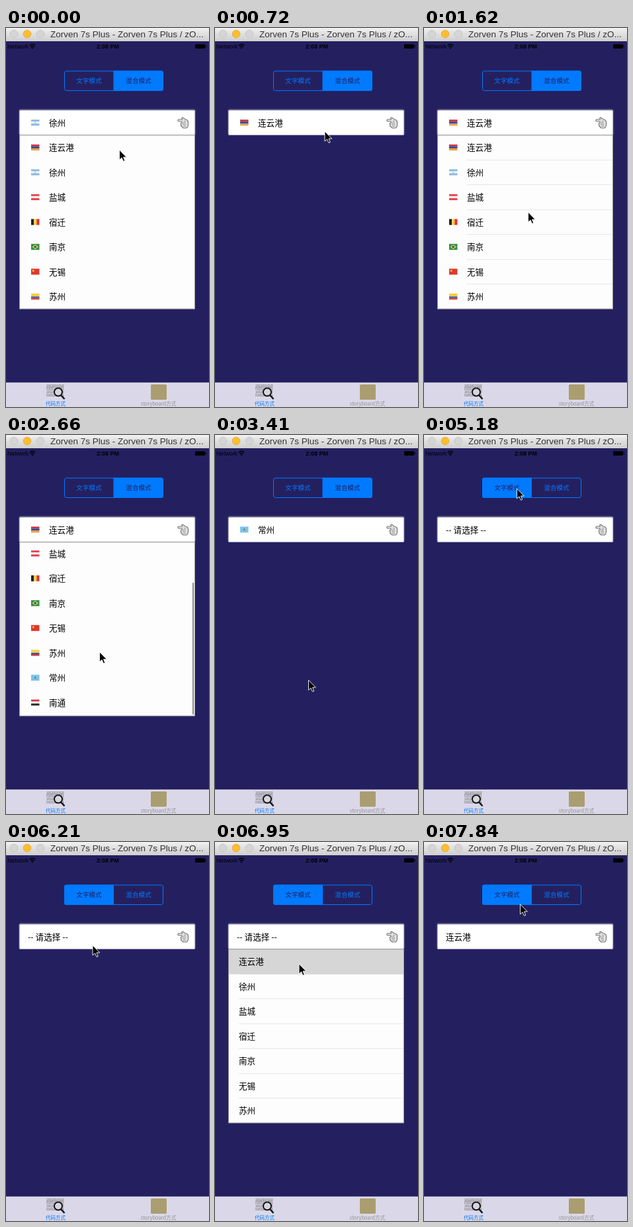
Write an HTML page that moves like this. It is 307 by 572 pixels and loops after 7.99 s.

```html
<!DOCTYPE html>
<html lang="zh">
<head>
<meta charset="utf-8">
<style>
html, body { margin: 0; height: 100%; overflow: hidden; background: #242060; }
svg { display: block; width: 100%; height: 100%; }
text { font-family: "Noto Sans CJK SC", "Noto Sans CJK", sans-serif; }
.latin { font-family: "Liberation Sans", Arial, sans-serif; }
.mid { text-anchor: middle; }
.item { font-size: 12.6px; }
.seg { font-size: 9.6px; }
.tab { font-size: 7.5px; }
#header { filter: drop-shadow(0 -.6px 1.2px #c4c4cc); }
</style>
</head>
<body>
<svg viewBox="0 0 307 572">
  <defs>
    <linearGradient id="chrome" x2="0" y2="1">
      <stop stop-color="#f4f4f4"/><stop offset=".3" stop-color="#e4e4e4"/><stop offset="1" stop-color="#cfcfcf"/>
    </linearGradient>
    <clipPath id="listClip"><rect id="listWindow" x="20" y="162" width="266" height="262"/></clipPath>
  </defs>
  <rect width="307" height="572" fill="#242060"/>

  <!-- Window title -->
  <rect width="307" height="20" fill="url(#chrome)"/>
  <g fill="#d5d5d5" stroke="#bdbdbd" stroke-width=".7">
    <circle cx="12" cy="9" r="5.8"/>
    <circle cx="32" cy="9" r="5.8" fill="#fdbd2f" stroke="#e0a02a"/>
    <circle cx="52" cy="9" r="5.8"/>
  </g>
  <text class="latin" x="67" y="14" font-size="13.5" fill="#333">Zorven 7s Plus - Zorven 7s Plus / zO...</text>

  <!-- Status bar -->
  <text class="latin" x="2" y="31" font-size="8.8">Network</text>
  <g fill="none" stroke="#000" stroke-width="1.3">
    <path d="M35.5 26.5Q40 22.5 44.5 26.5M37.2 28.7Q40 26.2 42.8 28.7"/>
    <circle cx="40" cy="30.3" r=".5"/>
  </g>
  <text class="latin mid" x="154" y="31" font-size="9" font-weight="bold">2:08 PM</text>
  <rect x="286" y="24.5" width="15" height="6.5" rx="1"/><rect x="301.5" y="26.5" width="1.3" height="2.5"/>

  <!-- Mode switch -->
  <rect x="88.5" y="65" width="149" height="29.5" rx="3" fill="none" stroke="#007aff"/>
  <path id="segFill" fill="#007aff"/>
  <text id="segText" class="seg mid" x="125.5" y="83">文字模式</text>
  <text id="segMixed" class="seg mid" x="200.5" y="83">混合模式</text>

  <!-- Drop-down -->
  <rect id="header" x="20.5" y="124.5" width="265" height="37" fill="#fff"/>
  <text id="headText" class="item" y="147.6"></text>
  <g id="headFlag"></g>
  <g transform="translate(259 134)" fill="#e2e2e2" stroke="#777" stroke-width="1.2" stroke-linejoin="round">
    <path d="M1.5 4Q0 6 2 7H7V9Q4 10 6 12 5 14 7 15L9 17H14Q16 16 16.5 13V7Q15 4 11.5 3.5L8 1Q6.5 1 7 3L7.5 4Z"/>
    <path d="M8 9.2H13M8 11.7H13M9 14.2H13M10 6.7H13" fill="none" stroke="#888" stroke-width=".9"/>
  </g>
  <g id="list" clip-path="url(#listClip)">
    <rect x="20.5" y="162" width="265" height="262" fill="#fdfdfd"/>
    <g id="rows"></g>
    <rect id="thumb" x="282" width="2" rx="1" fill="#8c8c8c"/>
  </g>
  <rect id="frame" x="20.5" y="161.7" width="265" fill="none" stroke="#999" stroke-width="1"/>

  <!-- Tab bar -->
  <rect y="535" width="307" height="37" fill="#dad8e8"/>
  <path d="M0 535.3H307" stroke="#b4b1c6" stroke-width=".6"/>
  <g id="bits" class="latin" fill="#555"></g>
  <circle cx="79" cy="549.5" r="6" fill="#d6d5df" stroke="#151515" stroke-width="2"/>
  <path d="M83.5 554.5L88.5 560" stroke="#151515" stroke-width="2.6"/>
  <text class="tab mid" x="75" y="570" fill="#007aff">代码方式</text>
  <rect x="219" y="538" width="24" height="23" rx="1.5" fill="#aa9e70"/>
  <text class="tab mid" x="230.5" y="570" fill="#929292">storyboard方式</text>

  <path id="cursor" d="M0 0V15L3.5 11.8 6 17.3 8.3 16.4 6 11H10.8Z" stroke="#fff" stroke-width=".9"/>
</svg>
<script>
const STEP = 148, LOOP = 7990, LAST = 53, ROW = 37.5, TOP = 162;
const $ = id => document.getElementById(id);
const set = (id, attrs) => Object.entries(attrs).forEach(([k, v]) => $(id).setAttribute(k, v));
const show = (id, on) => set(id, { visibility: on ? 'visible' : 'hidden' });

const rect = (x, y, w, h, fill) => `<rect x="${x}" y="${y}" width="${w}" height="${h}" fill="${fill}"/>`;
const stripes = (...colors) => colors.map((c, i) => rect(0, i * 9 / colors.length, 12.5, 9 / colors.length, c)).join('');
const bars = (...colors) => colors.map((c, i) => rect(i * 12.5 / 3, 0, 12.5 / 3, 9, c)).join('');
const dot = (x, y, r, c) => `<circle cx="${x}" cy="${y}" r="${r}" fill="${c}"/>`;

const cities = [
  ['连云港', stripes('#cf3340', '#33479c', '#e8a23c')],
  ['徐州', stripes('#86b9e6', '#f2f4f6', '#86b9e6') + dot(6.2, 4.5, 1.1, '#e0b84c')],
  ['盐城', stripes('#e0434e', '#f6f2f2', '#e0434e')],
  ['宿迁', bars('#222', '#f5cf3a', '#dc3540')],
  ['南京', stripes('#2f9148') + '<path d="M1.5 4.5L6.2 1 11 4.5 6.2 8Z" fill="#e6cf46"/>' + dot(6.2, 4.5, 1.8, '#2b4f92')],
  ['无锡', stripes('#df3a2e') + dot(3.2, 3.2, 1.4, '#f6cf3c')],
  ['苏州', stripes('#f2cd3e', '#f2cd3e', '#35509e', '#cc3844')],
  ['常州', stripes('#7cc4ec') + '<path d="M4.5 6.5L6.2 2.5 8 6.5Z" fill="#3c4a4a"/>' + dot(6.2, 5.6, 1, '#ead04a')],
  ['南通', stripes('#d63a45', '#f4f4f4', '#2a2a2a')],
];
const flagAt = (index, centerY) => `<g transform="translate(38 ${centerY - 4.7})">${cities[index][1]}</g>`;

$('bits').innerHTML = [0, 1, 2, 3].map(i =>
  `<text class="latin" x="61" y="${541.5 + i * 4.7}" font-size="4.9">${i % 2 ? '0101101001' : '1011010110'}</text>`).join('');

// Keys are [step, value, ...], read with linear interpolation.
const cursorKeys = [
  [0, 171.5, 184], [3, 171.5, 184], [5, 166, 156], [8, 166, 156], [11, 157.5, 278], [14, 148, 395],
  [15, 147, 390], [18, 141.5, 327.5], [21, 141.5, 370], [24, 141.5, 370], [28, 199, 230], [31, 124, 86],
  [32, 140.5, 81], [36, 140.5, 81], [41, 131, 156], [43, 131, 156], [45, 127, 184], [49, 127, 184],
  [52, 138, 103], [53, 145.5, 94]];
const openKeys = [[0, 1], [1, 1], [3, 0], [6, 0], [8, 1], [21, 1], [23, 0], [42, 0], [44, 1], [47, 1], [49, 0]];
const scrollKeys = [[14, 0], [15, 8], [17, 66], [18, 76.5], [20, 75], [22, 75], [23, 0]];

function sample(keys, s) {
  const next = keys.findIndex(k => k[0] > s);
  if (next === 0) return keys[0].slice(1);
  if (next < 0) return keys.at(-1).slice(1);
  const a = keys[next - 1], b = keys[next], p = (s - a[0]) / (b[0] - a[0]);
  return a.slice(1).map((v, i) => v + (b[i + 1] - v) * p);
}
const within = (s, ...ranges) => ranges.some(([a, b]) => s >= a && s <= b);

function drawSwitch(textMode) {
  set('segFill', { d: textMode ? 'M163 64.5H91Q88 64.5 88 67.5V92Q88 95 91 95H163Z'
                               : 'M162.5 64.5H235Q238 64.5 238 67.5V92Q238 95 235 95H162.5Z' });
  set('segText', { fill: textMode ? '#242060' : '#007aff' });
  set('segMixed', { fill: textMode ? '#007aff' : '#242060' });
}

function drawHeader(s, textMode) {
  const choice = s < 2 ? 1 : s < 22 ? 0 : s < 34 ? 7 : s < 48 ? -1 : 0;
  $('headText').textContent = choice < 0 ? '-- 请选择 --' : cities[choice][0];
  set('headText', { x: textMode ? 33 : 65 });
  $('headFlag').innerHTML = textMode ? '' : flagAt(choice, 143);
}

function drawList(s, textMode) {
  const [open] = sample(openKeys, s), [scroll] = sample(scrollKeys, s);
  const pressed = within(s, [1, 2], [46, 48]) ? 0 : within(s, [21, 22]) ? 7 : -1;
  const lines = within(s, [10, 14], [20, 22], [44, 48]);
  const left = textMode ? 36 : 65;
  show('list', open > 0);
  show('frame', open > 0);
  set('listWindow', { height: 262 * open });
  set('frame', { height: 262.3 * open });
  $('rows').innerHTML = cities.map(([name], i) => {
    const y = TOP + i * ROW - scroll;
    return (i === pressed ? rect(21, y, 264, ROW, '#d6d6d6') : '')
      + (lines ? rect(left, y + ROW - .6, 285 - left, .6, '#d8d8dc') : '')
      + (textMode ? '' : flagAt(i, y + 18.5))
      + `<text class="item" x="${left}" y="${y + 23.4}">${name}</text>`;
  }).join('');
  const thumbY = TOP + 1 + scroll * .78;
  set('thumb', { y: thumbY, height: Math.min(202, 422 - thumbY), opacity: within(s, [15, 19]) ? 1 : s === 20 ? .5 : 0 });
}

let drawn = -1;
function tick(now) {
  const s = Math.min(LAST, Math.floor((now % LOOP + 20) / STEP));
  if (s !== drawn) {
    drawn = s;
    const textMode = s >= 34;
    drawSwitch(textMode);
    drawHeader(s, textMode);
    drawList(s, textMode);
    set('cursor', { transform: `translate(${sample(cursorKeys, s)})` });
  }
  requestAnimationFrame(tick);
}
tick(performance.now());
</script>
</body>
</html>
```
